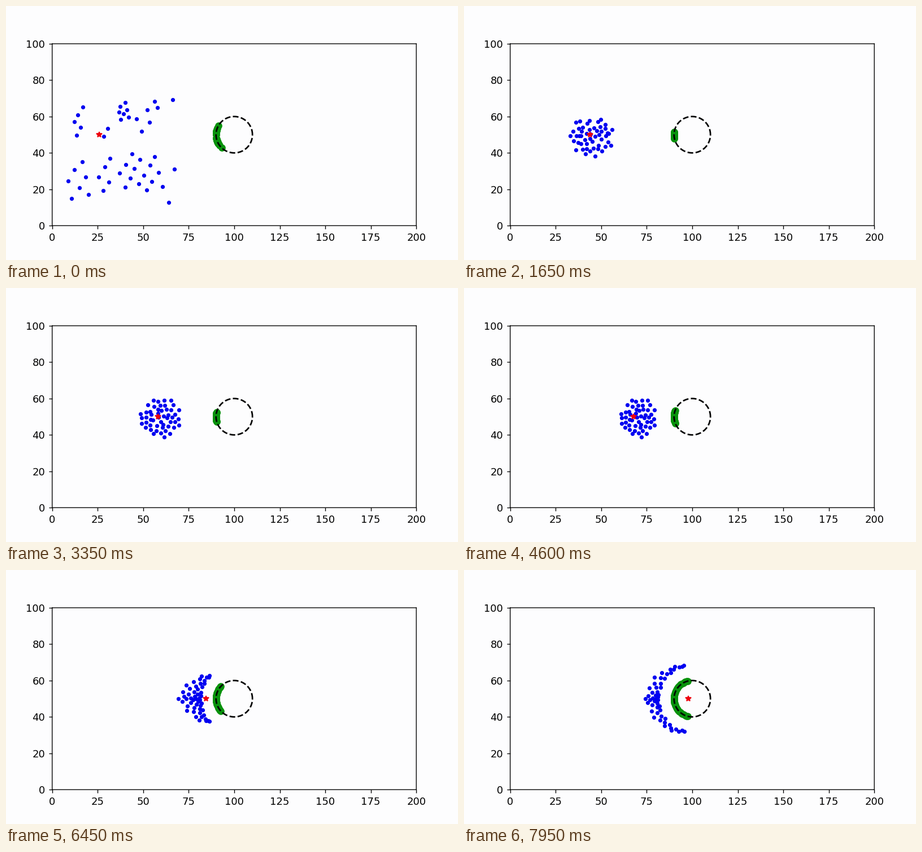
A matplotlib script that plays this animation: 800 px wide and 450 px high, repeating every 8000 ms.

```python
import numpy as np
import matplotlib.pyplot as plt
from matplotlib.animation import FuncAnimation

W, H, DPI = 800, 450, 128
FRAMES, INTERVAL = 160, 50
LEFT, RIGHT, TOP, BOTTOM = 81.7, 726.2, 66.9, 389.15   # plot box on the stage, px
S = 1.0152                                             # scale of the default style
PAPER, BLUE, GREEN, RED = "#fdfdfe", "#0000f0", "#08920c", "#ee000c"
CENTRE, RADIUS, GAP = np.array([100, 50]), 10, 18.4
N = 50
rng = np.random.default_rng(4)

# Groups the agents start in: middle x, middle y, width, height, agents
GROUPS = [(14, 57, 6, 17, 5), (29.2, 49, 5.6, -10, 2), (39, 62.5, 7, 12.5, 7),
          (51.5, 59, 12, 19, 5), (62, 65.5, 16, -9, 2), (14.3, 24.5, 12, 24, 7),
          (28.8, 27, 8, 20, 5), (49, 29, 24, 22, 15), (65.2, 12.5, 5, -48, 2)]


def spread(n):
    """n evenly spread (u, v) in the unit square, v stepping by the golden ratio."""
    i = np.arange(n)
    return (i + 0.5) / n, (0.5 + 0.618034 * i) % 1


def jitter(p, size):
    return p + rng.uniform(-size, size, p.shape)


def patch(x, y, w, h, n):
    u, v = spread(n)
    return np.column_stack([x + w * (u - 0.5), y + h * (v - 0.5)])


def disc(x, y, rx, ry):
    u, v = spread(N)
    r, a = np.sqrt(u), 2 * np.pi * v
    return np.column_stack([x + rx * r * np.cos(a), y + ry * r * np.sin(a)])


def crescent(span, depth):
    """Agents held off at GAP from the obstacle, banked up behind its near side."""
    u, v = spread(N)
    s = 2 * u - 1
    a = np.radians(span) * s * abs(s) ** 0.6
    r = GAP + depth * v ** 1.5 * (1 - s * s)
    return CENTRE + np.column_stack([-r * np.cos(a), r * np.sin(a)])


def match(a, b):
    """Order that lets the agents travel from a to b with as little crossing as possible."""
    order = np.empty(len(a), int)
    order[np.argsort(a[:, 0])] = np.argsort(b[:, 0])
    swapped = True
    while swapped:
        swapped = False
        for i in range(len(a)):
            for j in range(i):
                if (a[i] - a[j]) @ (b[order[i]] - b[order[j]]) < -1e-9:
                    order[[i, j]] = order[[j, i]]
                    swapped = True
    return order


def drift(pose, x, stretch):
    """Carry the flock along so that its middle, now at 59.3, lies at x."""
    return np.column_stack([x + stretch * (pose[:, 0] - 59.3), pose[:, 1]])


def spline(t, values, slopes):
    """Cubic Hermite curve through the key values."""
    i = min(np.searchsorted(KEYS, t, side="right") - 1, len(KEYS) - 2)
    h = KEYS[i + 1] - KEYS[i]
    u = (t - KEYS[i]) / h
    return ((1 + 2 * u) * (1 - u) ** 2 * values[i] + u * (1 - u) ** 2 * h * slopes[i]
            + u * u * (3 - 2 * u) * values[i + 1] + u * u * (u - 1) * h * slopes[i + 1])


KEYS = np.array([0, 18, 49, 67, 92, 129, 159])
start = jitter(np.vstack([patch(*g) for g in GROUPS]), 0.8)
gathered = jitter(patch(39.7, 46.8, 28.5, 26.5, N), 0.7)
gathered = gathered[match(start, gathered)]
flock = jitter(disc(59.3, 49.4, 11.7, 10.4), 0.7)
flock = flock[match(gathered, flock)]
split, wrapped = jitter(crescent(44, 13), 0.3), jitter(crescent(79, 8), 0.3)
order = match(flock, split)
poses = np.array([start, gathered, drift(flock, 51.4, 1.03), flock,
                  drift(flock, 70.2, 0.883), split[order], wrapped[order]])
pose_slopes = np.gradient(poses, KEYS, axis=0)
leader = np.array([25.8, 35.8, 51.7, 58.2, 67.7, 84.6, 97.8])
leader_slopes = np.gradient(leader, KEYS)

plt.rcParams.update({
    "font.family": "DejaVu Sans", "font.size": 10 * S, "path.snap": False,
    "axes.linewidth": 0.76 * S,
    "xtick.major.width": 0.76 * S, "ytick.major.width": 0.76 * S,
    "xtick.major.size": 3.5 * S, "ytick.major.size": 3.5 * S,
    "xtick.major.pad": 3.5 * S, "ytick.major.pad": 3.5 * S})

fig = plt.figure(figsize=(W / DPI, H / DPI), dpi=DPI, facecolor=PAPER)
ax = fig.add_axes([LEFT / W, 1 - BOTTOM / H, (RIGHT - LEFT) / W, (BOTTOM - TOP) / H],
                  facecolor=PAPER)
ax.set(xlim=(0, 200), ylim=(0, 100),
       xticks=range(0, 201, 25), yticks=range(0, 101, 20))

style = dict(ls="none", markersize=6 * S, markeredgewidth=S)
agents, = ax.plot([], [], ".", color=BLUE, **style)
shadows, = ax.plot([], [], "o", color=GREEN, **style)
angle = np.linspace(0, 2 * np.pi, 200)
ax.plot(CENTRE[0] + RADIUS * np.cos(angle), CENTRE[1] + RADIUS * np.sin(angle),
        "k--", lw=1.5 * S)
star, = ax.plot([], [], "*", color=RED, **style)


def update(frame):
    p = spline(frame, poses, pose_slopes)
    away = p - CENTRE
    # each agent's nearest point on the obstacle
    near = CENTRE + RADIUS * away / np.linalg.norm(away, axis=1, keepdims=True)
    agents.set_data(p[:, 0], p[:, 1])
    shadows.set_data(near[:, 0], near[:, 1])
    star.set_data([spline(frame, leader, leader_slopes)], [50])
    return agents, shadows, star


anim = FuncAnimation(fig, update, frames=FRAMES, interval=INTERVAL,
                     repeat=True, repeat_delay=0)
plt.show()
```
